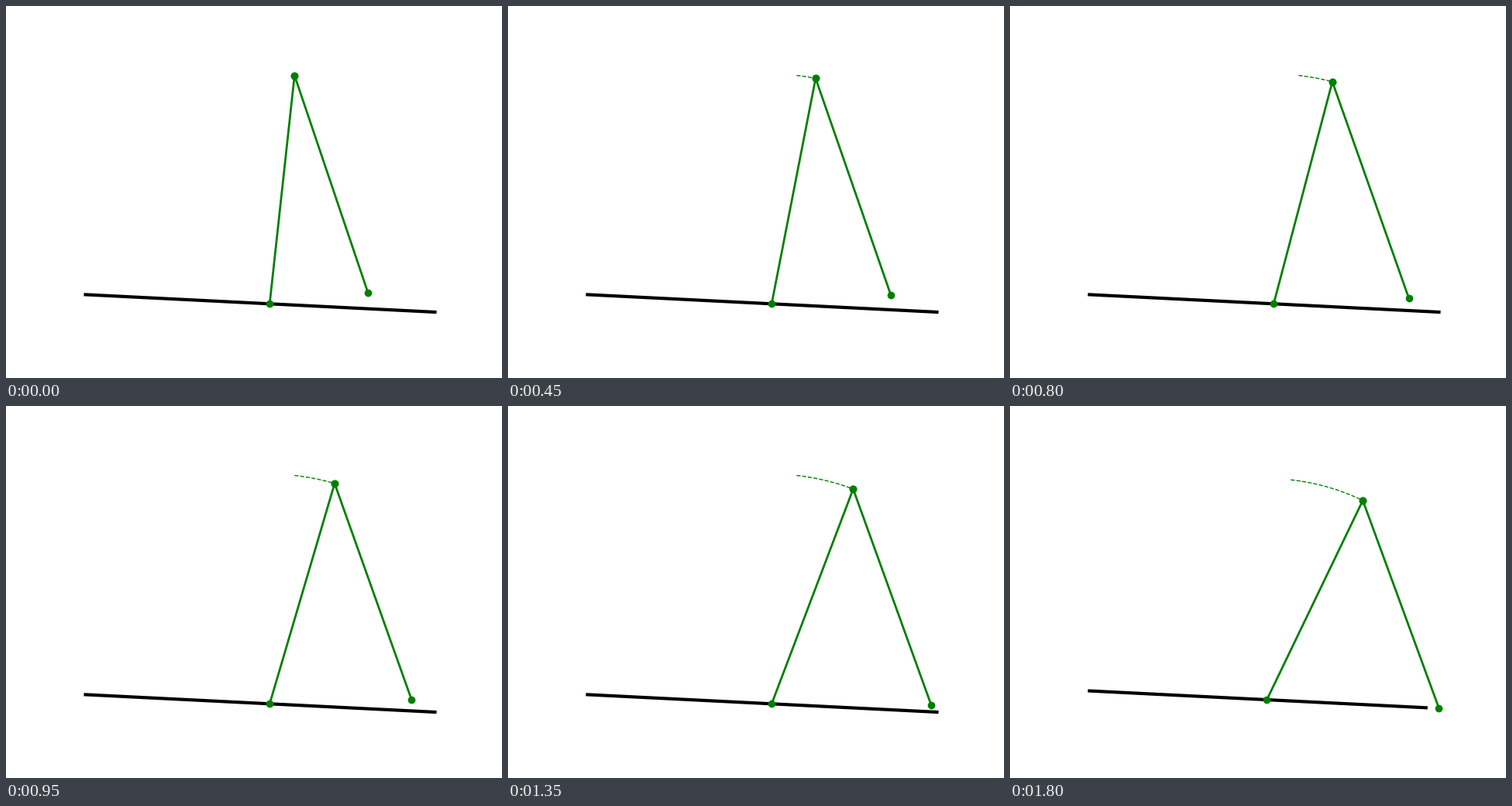
Write a matplotlib script that moves like this. It is 640 px wide and 480 px high and loops after 1850 ms.

```python
import numpy as np
import matplotlib.pyplot as plt
from matplotlib.animation import FuncAnimation

W, H, DPI = 640, 480, 100
FRAMES, INTERVAL = 37, 50

# Stage geometry in pixels, y pointing down
LEG = 296.45
PIVOT = np.array([340.2, 384.43])
LEFT, RIGHT = 102.545, 553.455
GROUND = np.array([[LEFT, 372.5], [RIGHT, 395.05]])
MID_Y, VIEW_Y = 242.5, 242.4


def stance_angle(n):
    return 0.1085 + 0.0093 * n + 4.2e-6 * n**2


def swing_angle(n):
    return 0.326 + 0.00098 * n - 7.8e-6 * n**2


def hip_at(n):
    a = stance_angle(n)
    return PIVOT + LEG * np.array([np.sin(a), -np.cos(a)])


def foot_at(n):
    a = swing_angle(n)
    return hip_at(n) + LEG * np.array([np.sin(a), np.cos(a)])


def fit_view(points, scale):
    """Shrink about the left edge and the vertical middle."""
    p = np.asarray(points)
    return (LEFT + (p[:, 0] - LEFT) * scale,
            VIEW_Y + (p[:, 1] - MID_Y) * scale)


fig = plt.figure(figsize=(W / DPI, H / DPI), dpi=DPI, facecolor="white")
ax = fig.add_axes([0, 0, 1, 1])
ax.set_xlim(0, W)
ax.set_ylim(H, 0)
ax.axis("off")

ground, = ax.plot([], [], "-", color="black", lw=3)
trace, = ax.plot([], [], "--", color="green", lw=1)
stance, = ax.plot([], [], "o-", color="green", lw=2)
swing, = ax.plot([], [], "o-", color="green", lw=2)


def update(n):
    hip, foot = hip_at(n), foot_at(n)
    # Zoom out once the foot passes the end of the ground
    scale = min(1, (RIGHT - LEFT) / (foot[0] - LEFT))
    ground.set_data(*fit_view(GROUND, scale))
    trace.set_data(*fit_view([hip_at(k) for k in range(n + 1)], scale))
    stance.set_data(*fit_view([PIVOT, hip], scale))
    swing.set_data(*fit_view([hip, foot], scale))
    return ground, trace, stance, swing


anim = FuncAnimation(fig, update, frames=FRAMES, interval=INTERVAL,
                     repeat=True, repeat_delay=0)
plt.show()
```
